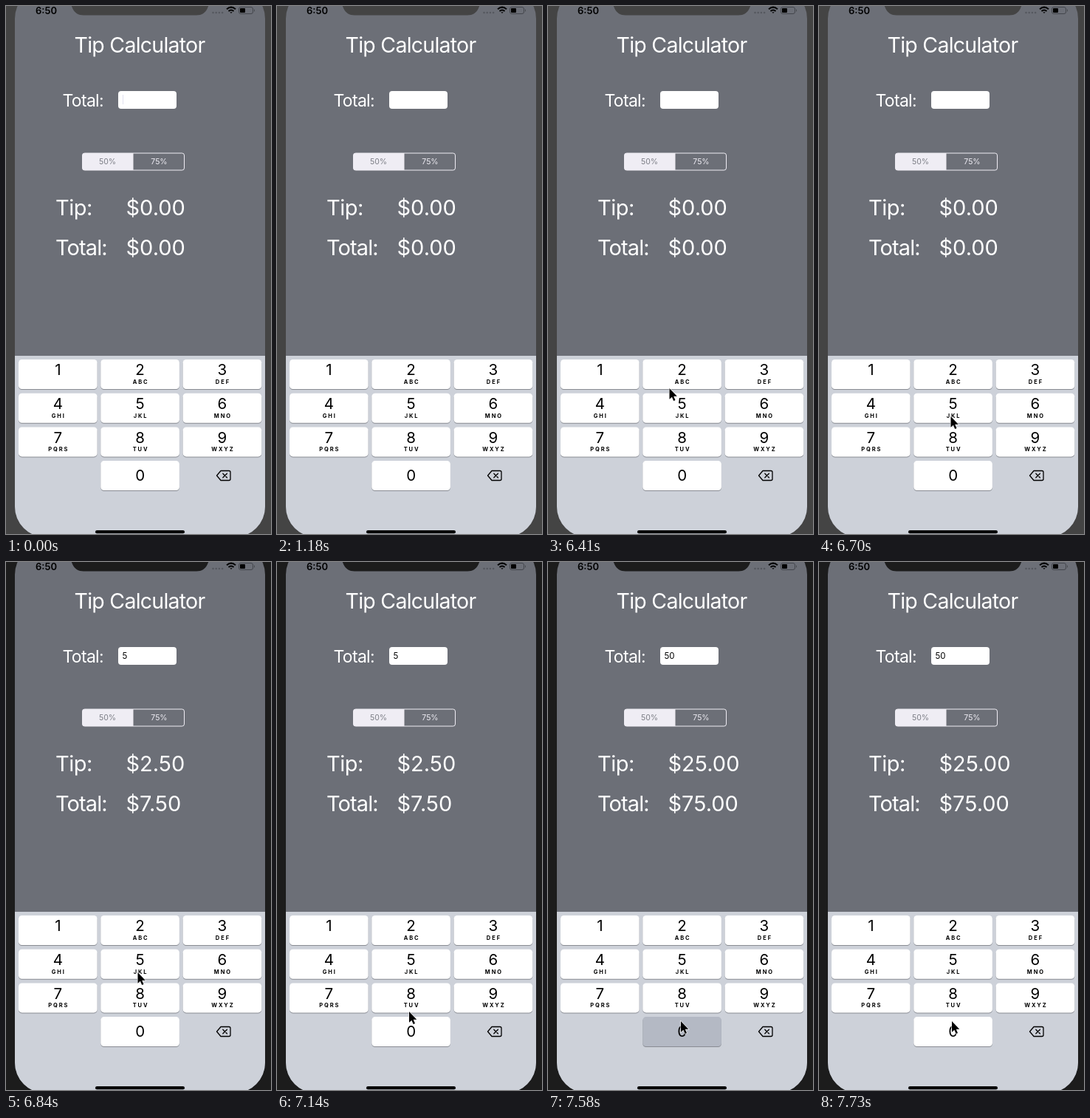
Write an HTML page that moves like this. It is 359x714 px and loops after 8000 ms.

```html
<!DOCTYPE html>
<html lang="en">
<head>
<meta charset="utf-8">
<title>Tip Calculator</title>
<style>
  html, body { margin: 0; width: 100%; height: 100%; overflow: hidden; background: #444; }
  svg { display: block; width: 359px; height: 714px; }
  text { font-family: Inter, "Liberation Sans", sans-serif; font-optical-sizing: none; }
  .big { font-size: 29px; fill: #fff; }
  .mid { text-anchor: middle; }
  .digit { font-size: 20.5px; }
  .sub { font-size: 7.5px; font-weight: 700; letter-spacing: 1.9px; }
  .seg { font-size: 10.5px; }
</style>
</head>
<body>
<svg viewBox="0 0 359 714">
  <defs>
    <clipPath id="screen"><rect x="12" y="-24" width="339" height="742" rx="41"/></clipPath>
  </defs>
  <rect class="bezel" width="359" height="714"/>
  <g clip-path="url(#screen)">
    <rect width="359" height="714" fill="#6c6f77"/>
    <rect y="473" width="359" height="241" fill="#cdd1d9"/>
    <path class="bezel" d="M82 -3C88 -3 89 0 90 3C93 9.500 98 12.500 105 12.500H258C265 12.500 270 9.500 273 3C274 0 275 -3 281 -3Z"/>

    <text class="mid" x="54.500" y="10.500" font-size="13" font-weight="600">6:50</text>
    <g fill="#55585f">
      <circle cx="280.500" cy="9" r="1.300"/><circle cx="284.700" cy="9" r="1.300"/>
      <circle cx="288.900" cy="9" r="1.300"/><circle cx="293.100" cy="9" r="1.300"/>
    </g>
    <g fill="none" stroke="#000" stroke-width="2">
      <path d="M299 4.200Q305 -1 311 4.200M301.500 7Q305 4 308.500 7"/>
      <path d="M303.400 8.200H306.600L305 10Z" fill="#000" stroke="none"/>
    </g>
    <rect x="315.500" y="1.500" width="19" height="9" rx="2.500" fill="none" stroke="#43464c"/>
    <rect x="317" y="3" width="7" height="6" rx="1"/>
    <path d="M336 4Q338 6 336 8Z" fill="#43464c"/>

    <text class="big mid" x="181" y="63" letter-spacing="-.75" style="font-size:28.500px">Tip Calculator</text>
    <text x="76.500" y="136" font-size="23" fill="#fff" letter-spacing="-.7">Total:</text>
    <rect x="152" y="115" width="79" height="24" rx="4" fill="#fff"/>
    <rect id="caret" x="158" y="120" width="1" height="13" fill="#dfe0f0"/>
    <text id="entry" x="157.500" y="131" font-size="11.500"></text>

    <path d="M172.500 199H106Q103.500 199 103.500 201.500V219.500Q103.500 222 106 222H172.500Z" fill="#efedf4"/>
    <rect x="103.500" y="199" width="138" height="23" rx="3" fill="none" stroke="#efedf4"/>
    <text class="seg mid" x="137.500" y="214" fill="#7b7d85">50%</text>
    <text class="seg mid" x="207.500" y="214" fill="#efedf4">75%</text>

    <text class="big" x="67" y="283" letter-spacing="-.5">Tip:</text>
    <text class="big" x="67" y="336.500" letter-spacing="-.9">Total:</text>
    <text class="big" id="tip" x="162.500" y="283"></text>
    <text class="big" id="total" x="162.500" y="336.500"></text>

    <g id="keys"></g>
    <g fill="none" stroke="#000" stroke-width="1.300" stroke-linejoin="round" stroke-linecap="round">
      <path d="M291 628.500H302Q304 628.500 304 630.500V639.500Q304 641.500 302 641.500H291L285.500 635Z"/>
      <path d="M293.800 632.200L299.400 637.800M299.400 632.200L293.800 637.800"/>
    </g>
    <rect x="121" y="709" width="121" height="4.300" rx="2.150"/>
  </g>
  <path id="cursor" d="M0 0V14.800L3.400 11.700L5.700 17L8 16L5.700 10.800H10.300Z" stroke="#fff" stroke-width="1.200" paint-order="stroke"/>
</svg>
<script>
const LOOP = 8000;
const $ = id => document.getElementById(id);
const bezel = document.querySelectorAll('.bezel');

const subs = ['', 'ABC', 'DEF', 'GHI', 'JKL', 'MNO', 'PQRS', 'TUV', 'WXYZ'];
const key = (label, sub, col, row) => {
  const x = 17 + col * 111.3, y = 478 + row * 45.7, mid = x + 53.3;
  return `<rect x="${x}" y="${y + 1}" width="106.6" height="40" rx="4.500" fill="#898c93"/>
    <rect id="key${label}" x="${x}" y="${y}" width="106.6" height="40" rx="4.500" fill="#fff"/>
    <text class="digit mid" x="${mid}" y="${y + (sub || label === 1 ? 21.3 : 27)}">${label}</text>
    <text class="sub mid" x="${mid + 1}" y="${y + 33}">${sub}</text>`;
};
$('keys').innerHTML = subs.map((s, i) => key(i + 1, s, i % 3, Math.floor(i / 3))).join('') + key(0, '', 1, 3);

// time, pointer x, pointer y
const moves = [
  [6120, 322.5, 639], [6260, 165.5, 518], [6410, 164.5, 517], [6550, 173.5, 543],
  [6700, 178.5, 555], [7140, 179, 608], [7280, 179, 620], [7430, 180, 621]
];
const entries = [[0, ''], [6840, '5'], [7580, '50']];
const at = (steps, t) => steps.filter(s => s[0] <= t).pop();
const money = n => '$' + n.toFixed(2);

function draw(t) {
  const amount = at(entries, t)[1], pos = at(moves, t);
  $('entry').textContent = amount;
  $('tip').textContent = money(amount * 0.5);
  $('total').textContent = money(amount * 1.5);
  $('caret').style.display = t < 1180 ? '' : 'none';
  $('cursor').style.display = pos ? '' : 'none';
  if (pos) $('cursor').setAttribute('transform', `translate(${pos[1]} ${pos[2]})`);
  $('key0').setAttribute('fill', t >= 7580 && t < 7730 ? '#b4b9c4' : '#fff');
  bezel.forEach(b => b.setAttribute('fill', t < 6840 ? '#444' : '#1c1c1c'));
}

const start = performance.now();
function tick() {
  draw((performance.now() - start) % LOOP);
  requestAnimationFrame(tick);
}
tick();
</script>
</body>
</html>
```
